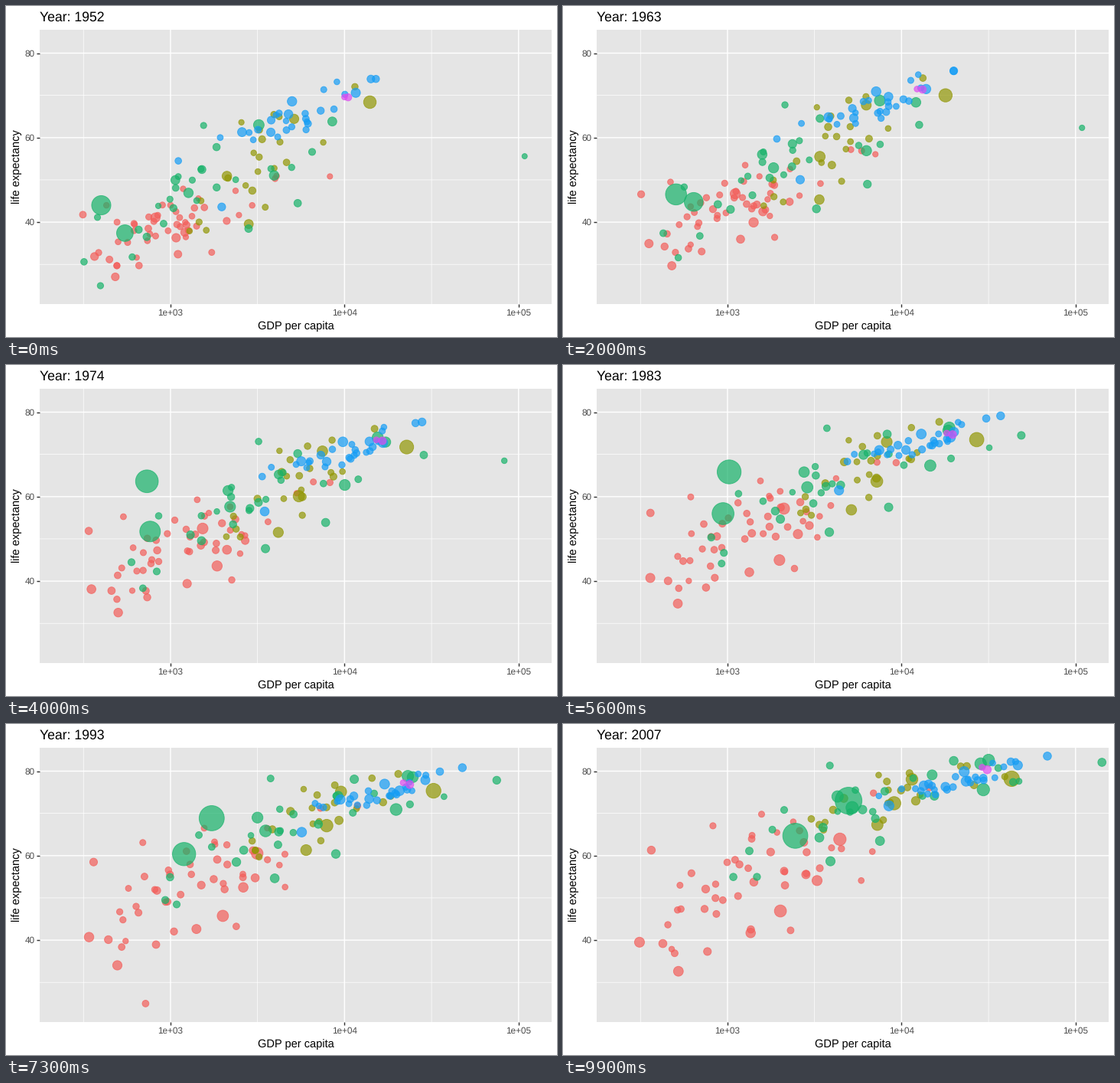
Recreate the animation shown at these times as a matplotlib script. Size 720x432 px, loop 10000 ms.

```python
import matplotlib.pyplot as plt
import numpy as np
from matplotlib.animation import FuncAnimation

W, H, DPI = 720, 432, 100
FRAMES, INTERVAL = 100, 100
FIRST, LAST = 1952, 2007
PT = 72 / DPI  # points per pixel

plt.rcParams["font.family"] = "Liberation Sans"
plt.rcParams["text.hinting"] = "none"

RED, OLIVE, GREEN, BLUE, PURPLE = (
    "#F35E5A", "#929705", "#17B26A", "#159DF5", "#DE4DF0")

years = np.linspace(FIRST, LAST, FRAMES)
surveys = np.arange(FIRST, LAST + 1, 5)
TREND = (1952, 1985, 2007)
MAX_POP = 1319
rng = np.random.default_rng(7)


def area(people):
    """Marker area for a population in millions."""
    size = 2 + 10 * np.sqrt(people / MAX_POP)
    return ((size * 2.845 + .945) * PT) ** 2


def spread(n):
    """Normal values with mean 0 and deviation 1."""
    z = rng.normal(size=(n, 1))
    return (z - z.mean()) / z.std()


def crowd(n, gdp, gdp_dev, life, life_dev, link, skew, pop, growth):
    """Tracks of n bubbles that follow a trend and slowly trade places.

    Trends give log10 GDP and life expectancy with their deviations;
    link is the correlation of the two.
    """
    turn = .7 * (surveys - FIRST) / (LAST - FIRST)
    wealth = spread(n) * np.cos(turn) + spread(n) * np.sin(turn)
    wealth = wealth + rng.normal(0, .05, (n, len(surveys))).cumsum(axis=1)
    health = link * wealth + np.sqrt(1 - link ** 2) * spread(n)
    wealth = wealth + skew * (wealth ** 2 - 1)

    def at(trend):
        return np.interp(surveys, TREND, trend)

    x = at(gdp) + at(gdp_dev) * wealth
    y = at(life) + at(life_dev) * health
    ceiling = at((74, 80, 84))
    y = ceiling - 2 * np.log1p(np.exp((ceiling - y) / 2))
    final = np.clip(pop * np.exp(1.1 * spread(n)[:, 0]), .3, 150)
    for xi, yi, p in zip(x, y, final):
        people = np.interp(years, (FIRST, LAST), (p / growth, p))
        yield (10 ** np.interp(years, surveys, xi),
               np.interp(years, surveys, yi), area(people))


def leader(pop0, pop1, *points):
    """Track of one standout bubble through (year, GDP, life) points."""
    when, gdp, life = np.array(points).T
    people = np.interp(years, (FIRST, LAST), (pop0, pop1))
    return (10 ** np.interp(years, when, np.log10(gdp)),
            np.interp(years, when, life), area(people))


CONTINENTS = [
    (RED,
     [leader(33, 135, (1952, 1077, 36.3), (1977, 1982, 44.5), (2007, 2014, 46.9)),
      leader(2.5, 9, (1952, 493, 40), (1987, 848, 44), (1992, 737, 23.6),
             (1997, 590, 36.1), (2007, 863, 46.2))],
     dict(n=50, gdp=(3, 3.15, 3.18), gdp_dev=(.28, .34, .38),
          life=(39.2, 53, 55), life_dev=(5, 7, 9), link=.45, skew=.13,
          pop=9, growth=3)),
    (OLIVE,
     [leader(158, 301, (1952, 13990, 68.4), (1972, 21806, 71.3), (2007, 42952, 78.2)),
      leader(57, 190, (1952, 2109, 50.9), (1980, 7000, 62.5), (2007, 9066, 72.4))],
     dict(n=23, gdp=(3.5, 3.8, 3.93), gdp_dev=(.22, .2, .25),
          life=(53.5, 67.5, 74), life_dev=(8.5, 5.5, 4), link=.65, skew=.1,
          pop=9, growth=2.5)),
    (GREEN,
     [leader(556, 1319, (1952, 400, 44), (1962, 488, 44.5), (1972, 677, 63.1),
             (1982, 962, 65.5), (1992, 1656, 68.7), (2007, 4959, 73)),
      leader(372, 1110, (1952, 547, 37.4), (1972, 724, 50.7),
             (1992, 1164, 60.2), (2007, 2452, 64.7)),
      leader(86, 127, (1952, 3217, 63), (1972, 14779, 73.4), (2007, 31656, 82.6)),
      leader(.2, 2.5, (1952, 108382, 55.6), (1972, 109348, 67.7),
             (1982, 31354, 71.3), (2007, 47307, 77.6))],
     dict(n=29, gdp=(3.16, 3.64, 3.84), gdp_dev=(.36, .43, .48),
          life=(46.5, 64, 71.5), life_dev=(8.5, 7.5, 7), link=.7, skew=.1,
          pop=22, growth=2.7)),
    (BLUE,
     [leader(22, 71, (1952, 1969, 43.6), (1982, 4241, 61), (2007, 8458, 71.8))],
     dict(n=29, gdp=(3.71, 4.15, 4.34), gdp_dev=(.25, .22, .24),
          life=(65.5, 73.7, 78.2), life_dev=(5, 2.6, 2.6), link=.85, skew=-.1,
          pop=9, growth=1.3)),
    (PURPLE, [],
     dict(n=2, gdp=(4.01, 4.29, 4.47), gdp_dev=(.01, .03, .07),
          life=(69.8, 75.3, 81), life_dev=(.2, .4, .5), link=.6, skew=0,
          pop=9, growth=2.2)),
]

tracks, colors = [], []
for color, leaders, rule in CONTINENTS:
    group = [*leaders, *crowd(**rule)]
    tracks += group
    colors += [color] * len(group)
tracks = np.array(tracks)

# Stage
LEFT, RIGHT, TOP, BOTTOM = 44.1, 712.67, 30.9, 388.8
fig = plt.figure(figsize=(W / DPI, H / DPI), dpi=DPI, facecolor="white")
ax = fig.add_axes([LEFT / W, 1 - BOTTOM / H, (RIGHT - LEFT) / W, (BOTTOM - TOP) / H],
                  facecolor="#E5E5E5")
ax.set_xscale("log")
ax.set_xlim(10 ** 2.2486, 10 ** 5.1887)
ax.set_ylim(20.65, 85.55)
ax.spines[:].set_visible(False)

DECADES, LIVES = (3, 4, 5), (40, 60, 80)
ax.set_xticks([10 ** d for d in DECADES], [""] * 3)
ax.set_yticks(LIVES, [""] * 3)
ax.tick_params(which="major", length=3.67 * PT, width=1.42 * PT, color="#333333")
ax.tick_params(which="minor", length=0)

# Thin lines lie halfway between the labelled ones.
for shift, width in ((.5, .71), (0, 1.42)):
    style = dict(color="white", lw=width * PT, snap=False, zorder=.5)
    for d in DECADES:
        ax.axvline(10 ** (d - shift), **style)
    for v in LIVES:
        ax.axhline(v - 20 * shift, **style)


def label(x, y, text, px, color="black", **kw):
    """Text with its baseline at stage pixel (x, y)."""
    return fig.text(x / W, 1 - y / H, text, size=px * PT, color=color,
                    va="baseline", rotation_mode="anchor", **kw)


for d in DECADES:
    label(215 + 227.4 * (d - 3), 404, f"1e+0{d}", 11.73, "#4D4D4D", ha="center")
for v in LIVES:
    label(37.7, 65.7 + (80 - v) * 5.515, str(v), 11.73, "#4D4D4D", ha="right")
label((LEFT + RIGHT) / 2, 422, "GDP per capita", 14.67, ha="center")
label(18, (TOP + BOTTOM) / 2, "life expectancy", 14.67, ha="center", rotation=90)
title = label(LEFT, 20, "", 17.6, ha="left")

dots = ax.scatter(tracks[:, 0, 0], tracks[:, 1, 0], s=tracks[:, 2, 0],
                  facecolors=colors, edgecolors=colors, alpha=.7,
                  linewidths=.945 * PT, zorder=3)


def update(i):
    dots.set_offsets(tracks[:, :2, i])
    dots.set_sizes(tracks[:, 2, i])
    title.set_text(f"Year: {round(years[i])}")
    return dots, title


anim = FuncAnimation(fig, update, frames=FRAMES, interval=INTERVAL,
                     repeat=True, repeat_delay=0)
plt.show()
```
